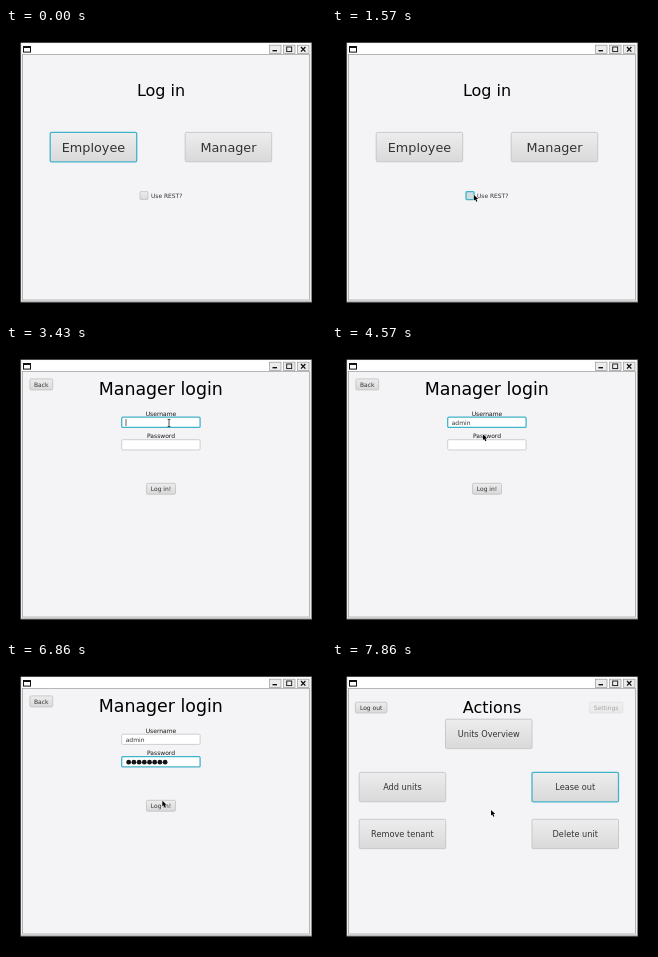
Write an HTML page that moves like this. It is 320 px wide and 289 px high and loops after 8 s.

```html
<!DOCTYPE html>
<html lang="en">
<head>
<meta charset="utf-8">
<title>Login walkthrough</title>
<style>
  html, body { margin: 0; width: 100%; height: 100%; overflow: hidden; background: #000; }
  svg { display: block; width: 100vw; height: 100vh; }
  text { font-family: "DejaVu Sans", sans-serif; fill: #333; text-anchor: middle; }
  .heading { fill: #000; }
  .label { fill: #151515; }
  .button { fill: url(#face); stroke: #c0c0c2; stroke-width: .8; }
  .field { fill: #fff; stroke: #c4c4c6; stroke-width: .8; }
  .focus { stroke: #42b4ca; stroke-width: 1.3; }
  .disabled { opacity: .4; }
  .start { text-anchor: start; }
  .ink { fill: none; stroke: #222; stroke-width: .7; }
</style>
</head>
<body>
<svg id="stage" viewBox="0 0 320 289" preserveAspectRatio="none">
  <defs>
    <linearGradient id="face" x2="0" y2="1">
      <stop stop-color="#ededed"/>
      <stop offset="1" stop-color="#d9d9da"/>
    </linearGradient>
  </defs>
</svg>
<script>
const LOOP = 8000, FPS = 7;
const stage = document.getElementById('stage');

function add(parent, tag, attrs, content = '') {
  const node = document.createElementNS('http://www.w3.org/2000/svg', tag);
  for (const name in attrs) node.setAttribute(name, attrs[name]);
  node.textContent = content;
  return parent.appendChild(node);
}
const box = (parent, x, y, width, height, attrs) =>
  add(parent, 'rect', { x, y, width, height, ...attrs });
const label = (parent, content, x, y, size, cls = '') =>
  add(parent, 'text', { x, y, 'font-size': size, class: cls }, content);

function button(parent, content, x, y, width, height, size, cls = '') {
  const group = add(parent, 'g', { class: cls });
  const face = box(group, x, y, width, height, { rx: 1.3, class: 'button' });
  label(group, content, x + width / 2, y + height / 2 + size * .36, size);
  return face;
}
const bigButton = (parent, content, x, y, size) => button(parent, content, x, y, 86.5, 29.4, size);
const field = (parent, y) => box(parent, 115.7, y, 78.4, 10.2, { rx: 1.2, class: 'field' });
const show = (node, on) => node.setAttribute('display', on ? 'inline' : 'none');
const focus = (node, on) => node.classList.toggle('focus', on);

function drawWindow() {
  box(stage, 14.5, 14.5, 291.5, 260, { fill: '#8b8b8b' });
  box(stage, 15, 15, 290, 258.5, { fill: '#ececec' });
  box(stage, 16.2, 15.2, 288, 11, { fill: '#fff' });
  box(stage, 16.5, 26.5, 287, 245.5, { fill: '#f4f3f5', stroke: '#a9a9aa', 'stroke-width': .8 });
  box(stage, 17.5, 18.5, 7, 5.6, { fill: '#fff', stroke: '#111' });
  box(stage, 17, 18, 8, 2, { fill: '#111' });
  for (const x of [263.5, 277.5, 291.5])
    box(stage, x, 17.2, 11.5, 8.4, { fill: '#ececec', stroke: '#999', 'stroke-width': .7 });
  box(stage, 266.5, 22, 4.5, 1.4, { fill: '#111' });
  box(stage, 280.7, 19, 5, 4.6, { fill: 'none', stroke: '#111', 'stroke-width': .9 });
  add(stage, 'path', { d: 'M295 19l4.4 4.6m0-4.6l-4.4 4.6', stroke: '#111', 'stroke-width': 1.3 });
}

drawWindow();

const start = add(stage, 'g');
label(start, 'Log in', 155, 68, 16, 'heading');
const employee = bigButton(start, 'Employee', 44.2, 104.4, 12.8);
bigButton(start, 'Manager', 179.2, 104.4, 12.8);
const check = box(start, 134, 163.6, 8, 8, { rx: 1, class: 'button' });
const tick = add(start, 'path', { d: 'M136 167.6l1.6 1.8 2.6-4', class: 'ink' });
label(start, 'Use REST?', 160.7, 169.9, 5.95);

const login = add(stage, 'g');
const back = button(login, 'Back', 23.9, 33.9, 22.8, 11, 6);
label(login, 'Manager login', 154.8, 50.4, 17.4, 'heading');
label(login, 'Username', 155, 70.5, 6, 'label');
const userField = field(login, 72.2);
label(login, 'Password', 155, 93, 6, 'label');
const passField = field(login, 94.7);
const userText = label(login, '', 119.7, 79.5, 6, 'start');
const dots = Array.from({ length: 8 }, (_, i) =>
  add(login, 'circle', { cx: 122.7 + i * 5.2, cy: 100.2, r: 2.4, fill: '#151515' }));
const caret = add(login, 'path', { class: 'ink' });
const submit = button(login, 'Log in!', 140.5, 138.3, 29, 10.9, 6);

const actions = add(stage, 'g');
label(actions, 'Actions', 160, 51, 16, 'heading');
button(actions, 'Log out', 23.4, 40.2, 31.5, 10.8, 6);
button(actions, 'Settings', 257.3, 40.2, 33.5, 10.8, 6, 'disabled');
bigButton(actions, 'Units Overview', 113.5, 57.2, 8.2);
bigButton(actions, 'Add units', 27.2, 110.4, 8.2);
focus(bigButton(actions, 'Lease out', 200, 110.4, 8.2), true);
bigButton(actions, 'Remove tenant', 27.2, 157.3, 8.2);
bigButton(actions, 'Delete unit', 200, 157.3, 8.2);

const arrow = add(stage, 'path', {
  d: 'M0 0v5.6l1.3-1.2 1 2.3 1.1-.5-1-2.2h1.8z',
  fill: '#000', stroke: '#fff', 'stroke-width': .5, 'paint-order': 'stroke'
});
const beam = add(stage, 'path', {
  d: 'M-1.4-3.6h2.8M0-3.6v7.2M-1.4 3.6h2.8', fill: 'none', stroke: '#222', 'stroke-width': .8
});

// Pointer route: [step, x, y]
const route = [
  [1, 112, 283], [2, 88, 202], [3, 68, 138], [4, 46, 119], [5, 142, 119], [6, 243, 122],
  [7, 196, 148], [8, 146, 165], [9, 142, 167], [12, 142, 167], [13, 166, 154],
  [14, 210, 130], [15, 229, 120.5], [18, 229, 120.5], [22, 163, 78], [31, 163, 78],
  [32, 151, 89.5], [34, 152, 105], [44, 152, 105], [45, 153, 113], [46, 156, 136],
  [47, 156, 136], [50, 157, 144.5], [53, 157, 144.5], [55, 159, 148]
];

function pointerAt(step) {
  const next = Math.max(1, route.findIndex(key => key[0] >= step));
  const [a, ax, ay] = route[next - 1], [b, bx, by] = route[next];
  const p = (step - a) / (b - a);
  return [ax + (bx - ax) * p, ay + (by - ay) * p];
}

function render(step) {
  const within = (from, to) => step >= from && step < to;
  show(start, step < 17);
  show(login, within(17, 55));
  show(actions, step >= 55);

  focus(employee, step < 11);
  focus(check, step >= 11);
  check.style.fill = within(11, 12) ? '#d3dde0' : '';
  show(tick, step >= 12);

  focus(back, step < 23);
  focus(userField, within(23, 35));
  focus(passField, within(35, 51));
  focus(submit, step >= 51);

  const letters = Math.min(5, Math.max(0, step - 24));
  userText.textContent = 'admin'.slice(0, letters);
  const filled = Math.min(8, Math.max(0, step - 37));
  dots.forEach((dot, i) => show(dot, i < filled));

  const inUser = step < 35;
  const caretX = inUser ? 120 + userText.getComputedTextLength() : 120.3 + filled * 5.2;
  caret.setAttribute('d', `M${caretX} ${inUser ? 74 : 96.5}v7`);
  show(caret, within(23, 30) || within(35, 47));

  const [x, y] = pointerAt(step);
  const overField = within(22, 32) || within(33, 45);
  for (const shape of [arrow, beam]) shape.setAttribute('transform', `translate(${x} ${y})`);
  show(arrow, step > 0 && !overField);
  show(beam, overField);
}

let origin, shown;
function play(now) {
  origin ??= now;
  const step = Math.floor(((now - origin) % LOOP + 5) * FPS / 1000) % (LOOP * FPS / 1000);
  if (step !== shown) render(shown = step);
  requestAnimationFrame(play);
}
render(0);
requestAnimationFrame(play);
</script>
</body>
</html>
```
